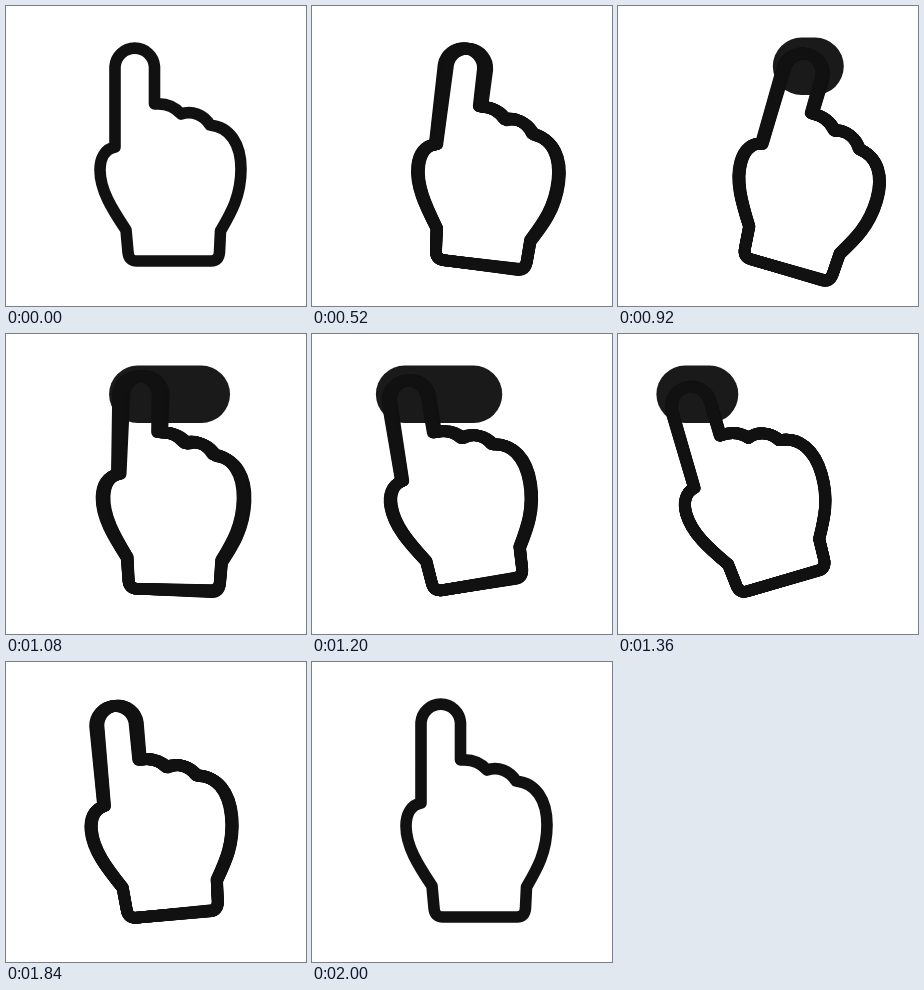
These frames come from a looping animation (300 px wide and 300 px high, 2.04 s). An HTML page with a canvas:

```html
<!DOCTYPE html>
<html lang="en">
<head>
<meta charset="utf-8">
<title>Swipe gesture</title>
<style>
  html, body { margin: 0; width: 100%; height: 100%; overflow: hidden; background: #fff; }
  canvas { display: block; width: 100vw; height: 100vh; }
</style>
</head>
<body>
<canvas id="stage" width="300" height="300"></canvas>
<script>
const ctx = document.getElementById('stage').getContext('2d');
const LOOP = 2040, STEP = 40;
const SHUTTER = 17, SAMPLES = 7;
const PIVOT = { x: 138, y: 261.5 };
const RIGHT = 20, LEFT = -18.3;
const TRAIL = { from: 197, to: 60, y: 60.3 };

const hand = new Path2D(
  'M109 141V60.5A19.8 19.8 0 0 1 148.5 60.5V98' +
  'C160 97 169 101 175 108C186 104 198 109 204 119' +
  'C224 121 235 138 235 163C235 190 225 207 214.5 225' +
  'L213.5 246Q213 255 205 255H131Q122.5 255 122 246L120 224' +
  'C106 203 94 184 94 164C94 152 99 143 109 141Z');

const mix = (a, b, p) => a + (b - a) * p;

// Eased progress from start to end; a and b are the x handles of a cubic-bezier(a, 0, b, 1)
function ease(t, start, end, a = 1 / 3, b = 2 / 3) {
  const x = Math.min(1, Math.max(0, (t - start) / (end - start)));
  let lo = 0, hi = 1;
  for (let i = 0; i < 24; i++) {
    const s = (lo + hi) / 2, r = 1 - s;
    if (3 * a * s * r * r + 3 * b * s * s * r + s * s * s < x) lo = s;
    else hi = s;
  }
  return lo * lo * (3 - 2 * lo);
}

const swipe = t => ease(t, 760, 1540, .44, .35);

function angle(t) {
  if (t < 760) return RIGHT * ease(t, 370, 745);
  if (t < 1550) return mix(RIGHT, LEFT, swipe(t));
  return LEFT * (1 - ease(t, 1565, 1990));
}

function drawTrail(t) {
  if (t < 800 || t >= 1520) return;
  ctx.strokeStyle = '#1a1a1a';
  ctx.lineWidth = 57.5;
  ctx.beginPath();
  ctx.moveTo(mix(TRAIL.from, TRAIL.to, ease(t, 1050, 1500)) + .01, TRAIL.y);
  ctx.lineTo(mix(TRAIL.from, TRAIL.to, swipe(t)), TRAIL.y);
  ctx.stroke();
}

function drawHand(deg) {
  ctx.save();
  ctx.translate(PIVOT.x, PIVOT.y);
  ctx.rotate(deg * Math.PI / 180);
  ctx.translate(-PIVOT.x, -PIVOT.y);
  ctx.stroke(hand);
  ctx.restore();
}

function draw(t) {
  ctx.fillStyle = '#fff';
  ctx.fillRect(0, 0, 300, 300);
  ctx.lineCap = ctx.lineJoin = 'round';
  drawTrail(t);
  ctx.strokeStyle = '#111';
  ctx.lineWidth = 11.6;
  // Motion blur: overlay the poses seen while the shutter is open
  let last = null;
  for (let i = 0; i < SAMPLES; i++) {
    const deg = angle(t + SHUTTER * (i / (SAMPLES - 1) - .5));
    if (deg !== last) drawHand(deg);
    last = deg;
  }
}

const start = performance.now();
function tick() {
  const t = (performance.now() - start) % LOOP;
  draw(Math.floor(t / STEP) * STEP);
  requestAnimationFrame(tick);
}
tick();
</script>
</body>
</html>
```
